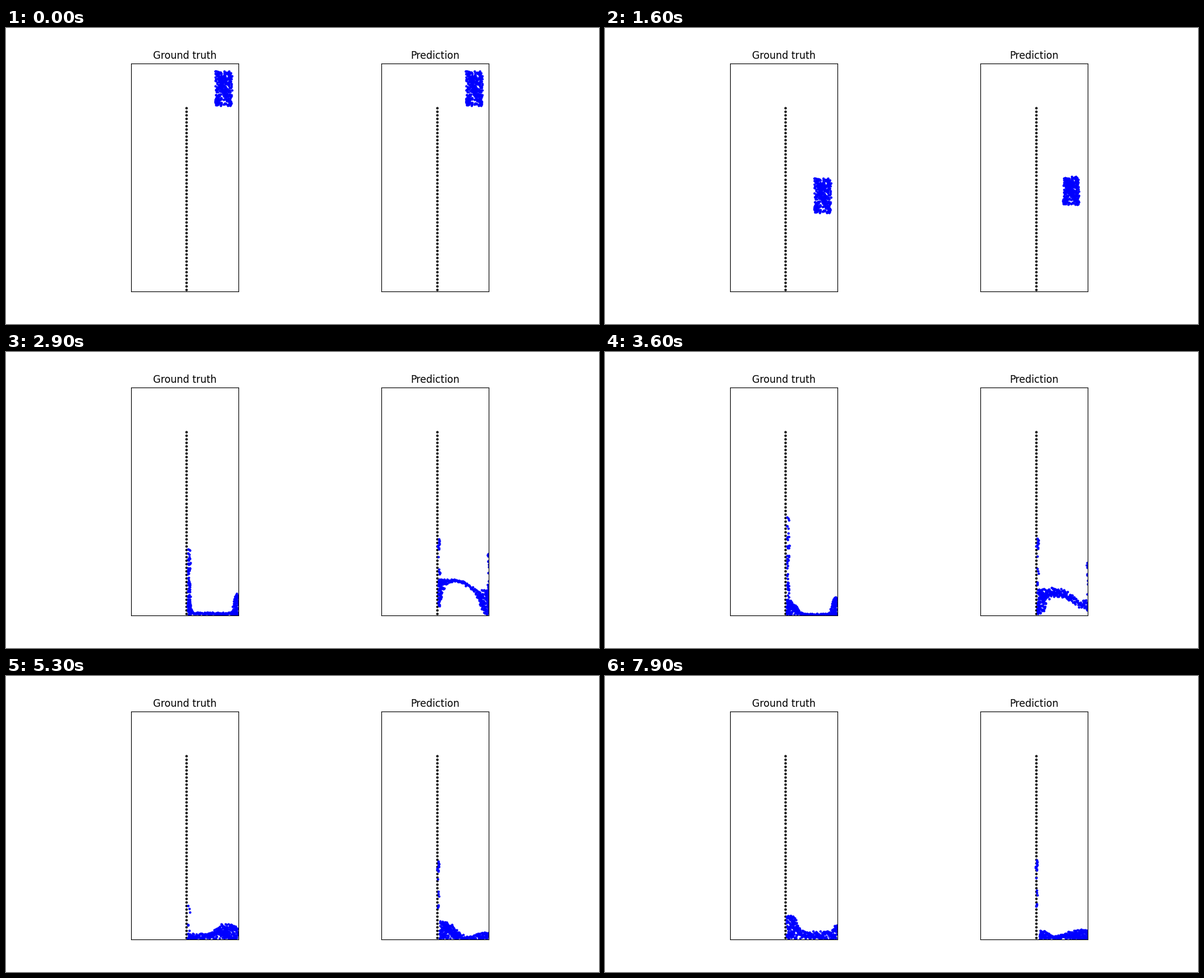
These frames come from a looping animation (1000 by 500 pixels, 8000 ms). A matplotlib script:

```python
import numpy as np
import matplotlib.pyplot as plt
from matplotlib.animation import FuncAnimation

FRAMES, STEP = 80, 100
N = 320
W, H, WALL = 181, 385, 93.7
V0, G = 0.95, 1.295            # fall speed and gravity, px per frame
X = np.linspace(95.5, W - 1, 400)

rng = np.random.default_rng(7)
U, V = np.sort(rng.uniform(size=N)), rng.uniform(size=N)


def smooth(s):
    s = np.clip(s, 0, 1)
    return s * s * (3 - 2 * s)


def hump(x, centre, width):
    return np.exp(-np.abs((x - centre) / width) ** 3)


def step(x, edge):
    return 1 / (1 + np.exp((edge - x) / 3))


def falling(n, squash):
    """The block in free fall; squash bends it on the way down."""
    s = squash * (n / 16) ** 2
    x = 142 + 28 * U - s * (1.5 + 4 * U + (1 - V) * (2 - 4 * U))
    y = 313.5 + 59 * V - V0 * n - G / 2 * n * n
    y += s * (14 * (1 - V) + 4 * U * V)
    return np.column_stack([x, np.maximum(y, 1)])


def jets(left, right, slow, fast, power):
    """Launch speeds; the fastest drops lie next to the walls."""
    speed = np.zeros(N)
    for part, order in ((slice(0, left), -1), (slice(N - right, N), 1)):
        u = np.sort(rng.uniform(size=speed[part].size))[::order]
        speed[part] = slow + (fast - slow) * u ** power
    return speed


class Water:
    """A falling block that turns into wall jets and a sloshing pool."""

    def __init__(self, waves, speed, launch, pull, blend, squash=0, cling=None):
        self.waves = np.array(waves, float).T
        self.speed, self.launch, self.pull = speed, launch, pull
        self.blend, self.squash, self.cling = blend, squash, cling
        near, far = rng.uniform(96, 100, N), rng.uniform(178.5, 181, N)
        self.jet_x = np.where(np.arange(N) < N / 2, near, far)

    def profile(self, n):
        t, *cols = self.waves
        c, a, w, b, edge, base = (np.interp(n, t, col) for col in cols)
        top = base + a * hump(X, c, w) + b * hump(X, W, edge)
        # a hollow under the arch, closing with time
        hollow = self.squash * np.clip((55 - n) / 25, 0, 1)
        gate = step(X, 101 + 1.3 * (n - 29)) * step(-X, -165 - 2 * (n - 29))
        low = 1 + hollow * gate * np.maximum(top - 9, 0)
        return low, np.maximum(top - 2, low + 0.5)

    def flow(self, n):
        tau = max(n - self.launch, 0)
        rise = self.speed * tau - self.pull / 2 * tau * tau
        lift = np.clip(rise / 10, 0, 1)
        mass = 1 - lift + 1e-9
        q = (np.cumsum(mass) - mass / 2) / mass.sum()
        low, top = self.profile(n)
        cum = np.cumsum(top - low)
        x = np.interp(q, cum / cum[-1], X)
        low, top = np.interp(x, X, low), np.interp(x, X, top)
        y = low + (top - low) * V
        return np.column_stack([x + lift * (self.jet_x - x),
                                y + lift * np.maximum(rise - y, 0)])

    def at(self, n):
        start, span = self.blend
        p = falling(n, self.squash)
        p += smooth((n - start) / span) * (self.flow(n) - p)
        if self.cling is not None:
            k = len(self.cling)
            goal = self.cling + np.array([-0.04, 0.1]) * (n - 44)
            p[:k] += smooth((n - 20) / 7) * (goal - p[:k])
        return p


# wave rows: frame, crest x, height, width, right height, right width, depth
truth = Water([(29, 96, 18, 6, 34, 9, 7.5),
               (44, 95, 29, 34, 26, 13, 3),
               (53, 160, 17, 20, 4, 8, 12),
               (67, 178, 42, 9, 29, 45, 2.5),
               (73, 130, 8, 25, 16, 45, 8),
               (79, 102, 27, 14, 14, 7, 16)],
              jets(90, 0, 5, 20.7, 1.5), launch=21.9, pull=1.167, blend=(21, 4))

cluster = np.column_stack([rng.uniform(93.3, 97, 11), np.linspace(114, 131, 11)])
low_drops = np.column_stack([rng.uniform(95, 97, 7),
                             [101, 80, 76, 72, 57, 55, 53]])
guess = Water([(29, 112, 62, 65, 20, 16, 2),
               (44, 128, 30, 38, 10, 4, 2),
               (53, 98, 27, 32, 9, 25, 6),
               (67, 100, 22, 17, 16, 38, 5),
               (79, 100, 12, 17, 14, 48, 5)],
              jets(40, 28, 8, 16.7, 1), launch=18, pull=G, blend=(17, 6),
              squash=1, cling=np.vstack([cluster, low_drops]))

fig, axes = plt.subplots(1, 2, figsize=(10, 5), dpi=100)
drops = []
for ax, name in zip(axes, ("Ground truth", "Prediction")):
    ax.set_title(name)
    ax.set(xlim=(0, W), ylim=(0, H), xticks=[], yticks=[], aspect=1)
    ax.plot(np.full(52, WALL), np.linspace(2.64, 310.04, 52), "o", ms=2,
            color="black")
    drops += ax.plot([], [], "o", ms=2, color="blue")


def draw(n):
    for line, water in zip(drops, (truth, guess)):
        line.set_data(*water.at(n).T)
    return drops


anim = FuncAnimation(fig, draw, frames=FRAMES, interval=STEP, repeat=True,
                     repeat_delay=0, init_func=lambda: draw(0))
plt.show()
```
